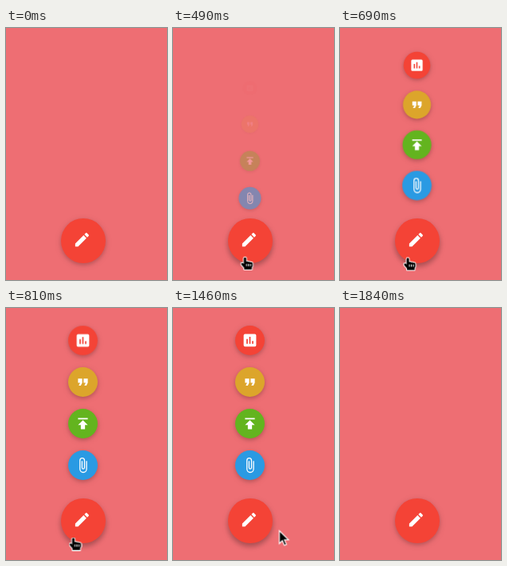
These frames come from a looping animation (202x315 px, 2670 ms). An HTML page:

```html
<!DOCTYPE html>
<html lang="en">
<head>
<meta charset="utf-8">
<title>Floating action button</title>
<style>
  html, body { margin: 0; width: 100%; height: 100%; overflow: hidden; background: #ee6e73; }
  :root { --loop: 2670ms linear infinite; }

  .fab, .slot, .item, .cursor { position: absolute; }
  .fab, .item {
    display: flex; align-items: center; justify-content: center; border-radius: 50%;
    box-shadow: 0 2px 5px rgba(0,0,0,.16), 0 2px 10px rgba(0,0,0,.12);
  }
  .fab {
    left: 69px; top: 238px; width: 55.5px; height: 55.5px; background: #f44336;
    animation: lift var(--loop);
  }
  .slot {
    left: 78px; top: calc(178px - 52px * var(--n)); width: 37px; height: 37px;
    animation: close var(--loop);
  }
  .item {
    inset: 0; background: var(--c);
    animation: grow var(--loop) backwards, fade var(--loop) backwards;
    animation-delay: calc(36ms * var(--n));
  }
  svg { display: block; fill: #fff; }
  .item svg { width: 21px; height: 21px; }
  .fab svg { width: 22.8px; height: 22.8px; transform: translate(-1px, -.8px); }

  .cursor { left: 0; top: 0; width: 1px; height: 1px; overflow: visible; fill: #000; stroke: #fff; animation: travel var(--loop); }
  .outline { stroke-width: 2; stroke-linejoin: round; paint-order: stroke; }
  .hand { animation: hand var(--loop); }
  .arrow { animation: arrow var(--loop); }

  /* Opening is staggered per item; closing is shared by all of them. */
  @keyframes grow {
    0%, 13.37% { transform: translateY(40px) scale(.4); animation-timing-function: cubic-bezier(.333,.667,.667,1); }
    27.23%, 100% { transform: none; }
  }
  @keyframes fade {
    0%, 13.37% { opacity: 0; animation-timing-function: cubic-bezier(.333,0,.667,.333); }
    20.2%, 100% { opacity: 1; }
  }
  @keyframes close {
    0%, 11% { opacity: 0; transform: none; }
    11.01%, 58.31% { opacity: 1; transform: none; animation-timing-function: cubic-bezier(.455,.03,.515,.955); }
    65.17%, 100% { opacity: 0; transform: translateY(40px) scale(.4); }
  }
  @keyframes lift {
    0%, 12.2%, 61%, 100% { box-shadow: 0 2px 5px rgba(0,0,0,.16), 0 2px 10px rgba(0,0,0,.12); }
    19%, 55% { box-shadow: 0 4px 6px rgba(0,0,0,.22), 0 3px 10px rgba(0,0,0,.12); }
  }
  @keyframes travel {
    0%, 6.2% { transform: translate(214px, 268px); }
    6.37% { transform: translate(193px, 271px); }
    12.36% { transform: translate(110.5px, 283.5px); }
    16.85% { transform: translate(92px, 286.5px); }
    22.85% { transform: translate(85.5px, 287.5px); }
    30.34%, 48.2% { transform: translate(84.5px, 287.5px); animation-timing-function: ease-in; }
    54.68% { transform: translate(132.5px, 278.5px); }
    58.2%, 100% { transform: translate(214px, 272px); }
  }
  @keyframes hand {
    0%, 11.5% { opacity: 0; }
    11.51%, 53.3% { opacity: 1; }
    53.31%, 100% { opacity: 0; }
  }
  @keyframes arrow {
    0%, 11.5% { opacity: 1; }
    11.51%, 53.3% { opacity: 0; }
    53.31%, 100% { opacity: 1; }
  }
</style>
</head>
<body>
  <div class="slot" style="--n:0; --c:#2a9ae3"><div class="item">
    <svg viewBox="0 0 24 24"><path fill="none" stroke="#fff" stroke-width="1.5" d="M17.25 6v11.5a4.75 4.75 0 0 1-9.5 0V5a3.25 3.25 0 0 1 6.5 0v10.5a1.75 1.75 0 0 1-3.5 0V6"/></svg>
  </div></div>
  <div class="slot" style="--n:1; --c:#63b41f"><div class="item">
    <svg viewBox="0 0 24 24"><path d="M5 4v2h14V4zM5 14h4v6h6v-6h4l-7-7z"/></svg>
  </div></div>
  <div class="slot" style="--n:2; --c:#dca52b"><div class="item">
    <svg viewBox="0 0 24 24"><path d="M6 17h3l2-4V7H5v6h3zm8 0h3l2-4V7h-6v6h3z"/></svg>
  </div></div>
  <div class="slot" style="--n:3; --c:#f44336"><div class="item">
    <svg viewBox="0 0 24 24"><path fill-rule="evenodd" d="M5 3h14a2 2 0 0 1 2 2v14a2 2 0 0 1-2 2H5a2 2 0 0 1-2-2V5a2 2 0 0 1 2-2zM7 10v7h2v-7zM11 7v10h2V7zM15 13v4h2v-4z"/></svg>
  </div></div>

  <div class="fab">
    <svg viewBox="0 0 24 24"><path d="M3 17.25V21h3.75L17.81 9.94l-3.75-3.75zM20.71 7.04a1 1 0 0 0 0-1.41l-2.34-2.34a1 1 0 0 0-1.41 0l-1.83 1.83 3.75 3.75z"/></svg>
  </div>

  <svg class="cursor">
    <g class="hand">
      <path class="outline" d="M-1.5 1.2Q-1.5 0 0 0T1.5 1.2V5H4V5.5H6.5V6H8.5Q9.5 6 9.5 7.5V11L8.5 12.5V15H-1V13L-4.5 9V7H-2.5L-1.5 8.2Z"/>
      <path d="M2 8v3M4.5 8v3M7 8v3"/>
    </g>
    <path class="arrow" stroke-width="1.2" d="M0 0V16L3.8 12.4 6.3 18.2 8.9 17.1 6.4 11.4H11.5Z"/>
  </svg>
</body>
</html>
```
